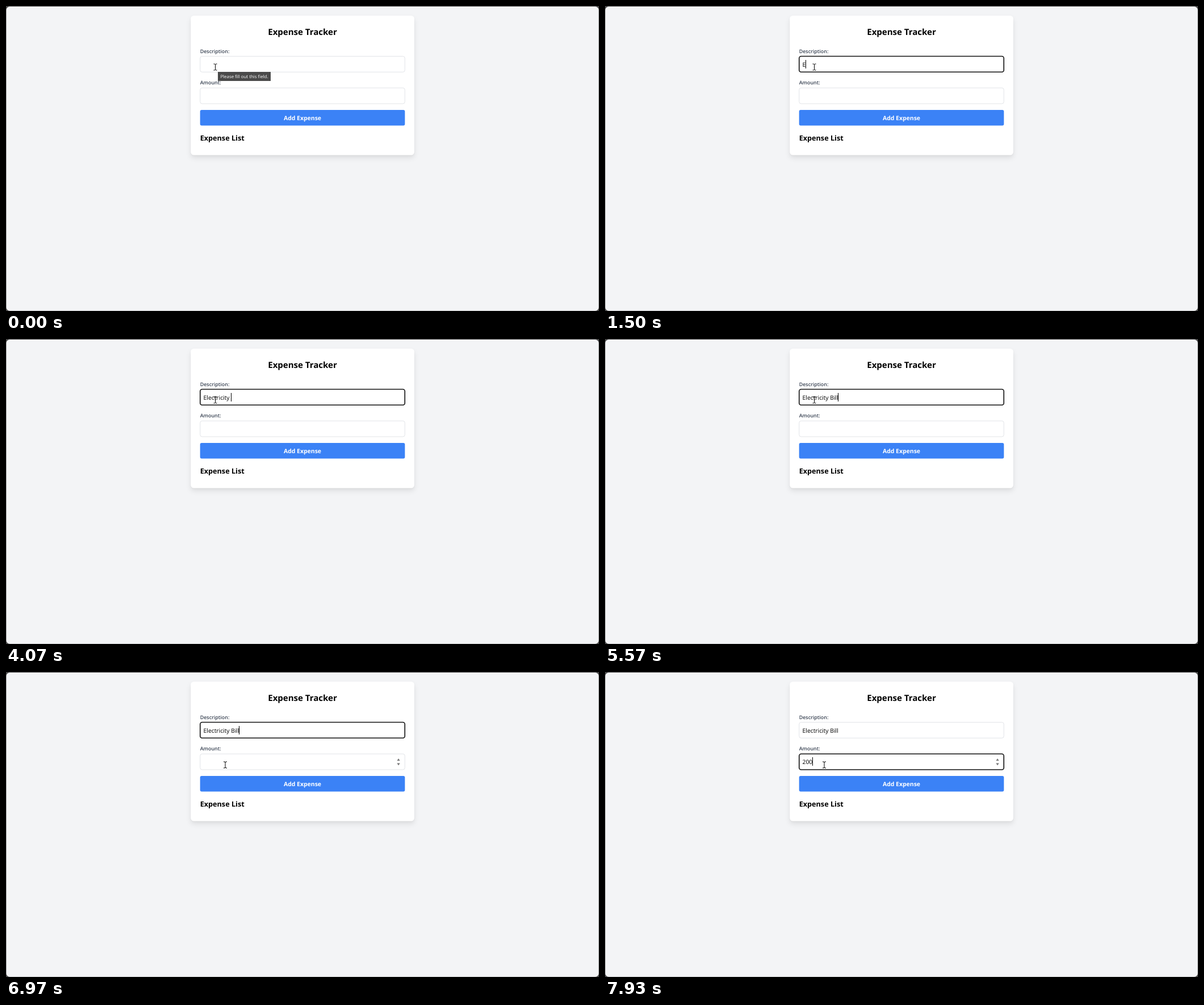
Write an HTML page that moves like this. It is 1044 px wide and 537 px high and loops after 8 s.

```html
<!DOCTYPE html>
<html lang="en">
<head>
<meta charset="utf-8">
<title>Expense Tracker</title>
<style>
  html, body { margin: 0; width: 100%; height: 100%; overflow: hidden; background: #444; }
  svg { display: block; width: 1044px; height: 537px; }
  text { font-family: "Open Sans", "Noto Sans", sans-serif; text-rendering: geometricPrecision; white-space: pre; }
  .card { fill: #fff; filter: drop-shadow(0 5px 4px rgb(0 0 0 / .09)) drop-shadow(0 1px 1px rgb(0 0 0 / .04)); }
  .label { font-size: 8.9px; font-weight: 600; fill: #374151; }
  .bold { font-weight: 700; }
  .value { font-size: 10.36px; }
  .box { fill: #fff; stroke: #e2e4e8; stroke-width: 1; }
  .box.focus { stroke: #101010; stroke-width: 1.6; }
</style>
</head>
<body>
<svg viewBox="0 0 1044 537">
  <rect x=".5" y="1" width="1043" height="535.7" rx="6" fill="#f3f4f6"/>
  <rect class="card" x="325.3" y="17" width="393.5" height="245.5" rx="5.5"/>
  <text class="bold" x="522" y="51" font-size="15" text-anchor="middle">Expense Tracker</text>

  <text class="label" x="341.7" y="82.5">Description:</text>
  <rect class="box" x="341.8" y="88.5" width="360.4" height="27.8" rx="3.5"/>
  <text class="value" x="347.5" y="106.8"></text>

  <text class="label" x="341.7" y="138.3">Amount:</text>
  <rect class="box" x="341.8" y="144.2" width="360.4" height="27.8" rx="3.5"/>
  <text class="value" x="347.5" y="162.4"></text>
  <path id="spinner" fill="#777" d="M688.3 156.3L691 152.3L693.7 156.3ZM688.3 160.5L691 164.5L693.7 160.5Z"/>

  <rect x="341.7" y="183" width="360.6" height="27.5" rx="2.75" fill="#3b82f6"/>
  <text class="bold" x="522" y="201.4" font-size="10.44" text-anchor="middle" fill="#fff">Add Expense</text>
  <text class="bold" x="341.7" y="236.7" font-size="12.65">Expense List</text>

  <g id="tooltip">
    <rect x="373" y="116" width="93" height="16" fill="#4a4a4a"/>
    <text x="377.4" y="127" font-size="7.86" fill="#fff">Please fill out this field.</text>
  </g>
  <rect id="caret" width="1" height="15"/>
  <path id="cursor" fill="none" stroke="#000" d="M-3 -5.5H-1L0 -4.5L1 -5.5H3M0 -4.5V4.5M-3 5.5H-1L0 4.5L1 5.5H3"/>
</svg>
<script>
const LOOP = 8000, BLINK = 530, SWITCH = 7030;
const fields = [
  { text: "Electricity Bill", focusAt: 100, baseY: 95,
    keys: [1500, 1700, 1800, 2270, 2700, 2900, 3100, 3270, 3400, 3700, 3930, 4070, 4570, 5200, 5400, 5570] },
  { text: "200", focusAt: SWITCH, baseY: 150.5, keys: [7430, 7770, 7930] }
];
// Pointer waypoints: time, x, y
const path = [
  [0, 368.5, 107.5], [6100, 368.5, 107.5], [6330, 382, 107], [6570, 382, 107],
  [6730, 386, 168], [6870, 386, 168], [6900, 386, 233], [6970, 386, 163.5], [LOOP, 386, 163.5]
];
const byId = id => document.getElementById(id);
const boxes = document.querySelectorAll(".box"), values = document.querySelectorAll(".value");
const show = (el, on) => el.setAttribute("visibility", on ? "visible" : "hidden");

function pointerAt(t) {
  const i = Math.max(1, path.findIndex(p => p[0] > t));
  const [t0, x0, y0] = path[i - 1], [t1, x1, y1] = path[i];
  const k = (t - t0) / (t1 - t0);
  return [x0 + (x1 - x0) * k, y0 + (y1 - y0) * k];
}

function draw(t) {
  const active = t >= SWITCH ? 1 : t >= 100 ? 0 : -1;
  fields.forEach((field, i) => {
    const typed = field.keys.filter(k => k <= t);
    values[i].textContent = field.text.slice(0, typed.length);
    boxes[i].classList.toggle("focus", i === active);
    if (i !== active) return;
    // Every keystroke restarts the blink
    const since = t - (typed.at(-1) ?? field.focusAt);
    const width = typed.length ? values[i].getComputedTextLength() : 0;
    byId("caret").setAttribute("x", Math.floor(347.4 + width));
    byId("caret").setAttribute("y", Math.floor(field.baseY));
    show(byId("caret"), Math.floor(since / BLINK) % 2 === 0);
  });
  if (active < 0) show(byId("caret"), false);

  const [x, y] = pointerAt(t);
  byId("cursor").setAttribute("transform", `translate(${x} ${y})`);
  show(byId("spinner"), y > 144 && y < 172);
  show(byId("tooltip"), t < 100);
}

function tick() {
  draw(performance.now() % LOOP);
  requestAnimationFrame(tick);
}
tick();
</script>
</body>
</html>
```
